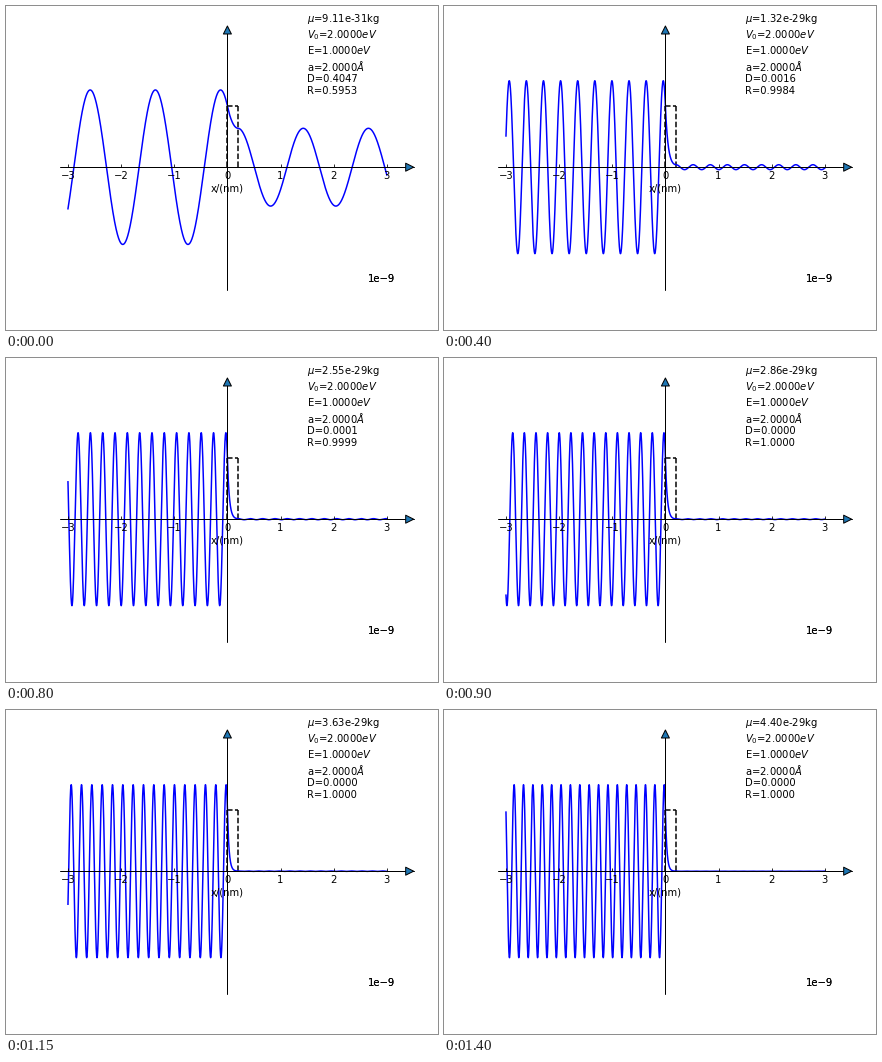
These frames come from a looping animation (432 by 324 pixels, 1450 ms). A matplotlib script:

```python
import numpy as np
import matplotlib.pyplot as plt
from matplotlib.animation import FuncAnimation
from mpl_toolkits import axisartist

HBAR = 1.055e-34      # J s
EV = 1.602e-19        # J
M_E = 9.11e-31        # kg
NM = 1e-9             # m
ENERGY = 1.0          # eV
BARRIER = 2.0         # eV, twice the energy, so k equals kappa
WIDTH = 0.2           # nm
FRAMES, INTERVAL = 29, 50

masses = M_E * np.linspace(1, 50, FRAMES + 1)
x = np.linspace(-3, 3, 6001)


def wave_number(mass):
    """Wave number in 1/nm, the same outside and inside the barrier."""
    return np.sqrt(2 * mass * ENERGY * EV) / HBAR * NM


def wave(k):
    """Real part of the stationary state for a unit incoming wave."""
    left = np.cos(k * x) - np.tanh(k * WIDTH) * np.sin(k * x)
    inside = np.cosh(k * (WIDTH - np.clip(x, 0, WIDTH)))
    right = np.cos(k * (x - WIDTH))
    beyond = np.where(x < WIDTH, inside, right) / np.cosh(k * WIDTH)
    return np.where(x < 0, left, beyond)


def caption(mass, k):
    passed = 1 / (1 + np.sinh(k * WIDTH) ** 2)
    return "\n".join([
        rf"$\mu$={mass:.2e}kg",
        rf"$V_0$={BARRIER:.4f}$eV$",
        rf"E={ENERGY:.4f}$eV$",
        rf"a={WIDTH * 10:.4f}$Å$",
        f"D={passed:.4f}",
        f"R={1 - passed:.4f}",
    ])


fig = plt.figure(figsize=(6, 4.5), dpi=72)
fig.subplots_adjust(left=0.125, right=0.9, bottom=0.125, top=0.88)
ax = fig.add_subplot(axes_class=axisartist.Axes)
ax.set_xlim(-3.15, 3.15)
ax.set_ylim(-2, 2)

# Arrowed axes through the origin
ax.axis[:].set_visible(False)
for coord, name in enumerate("xy"):
    axis = ax.axis[name] = ax.new_floating_axis(coord, 0)
    axis.set_axisline_style("-|>", size=2.0)
    axis.line.set_facecolor("C0")
ax.axis["x"].label.set_text("x/(nm)")
ax.axis["y"].toggle(all=False)

# The scale label is printed twice, which makes it look heavier
for _ in range(2):
    fig.text(0.9, 48 / 324, "1e\N{MINUS SIGN}9", ha="right", va="baseline")

for xs, ys in [([0, 0], [0, 1]), ([0, WIDTH], [1, 1]), ([WIDTH, WIDTH], [0, 1])]:
    ax.plot(xs, ys, "k--", lw=1.5)
curve, = ax.plot([], [], "b-", lw=1.5)
info = ax.text(1.5, 1.2, "")


def update(i):
    k = wave_number(masses[i])
    curve.set_data(x, wave(k))
    info.set_text(caption(masses[i], k))
    return curve, info


anim = FuncAnimation(fig, update, frames=FRAMES, interval=INTERVAL,
                     repeat=True, repeat_delay=0)
plt.show()
```
